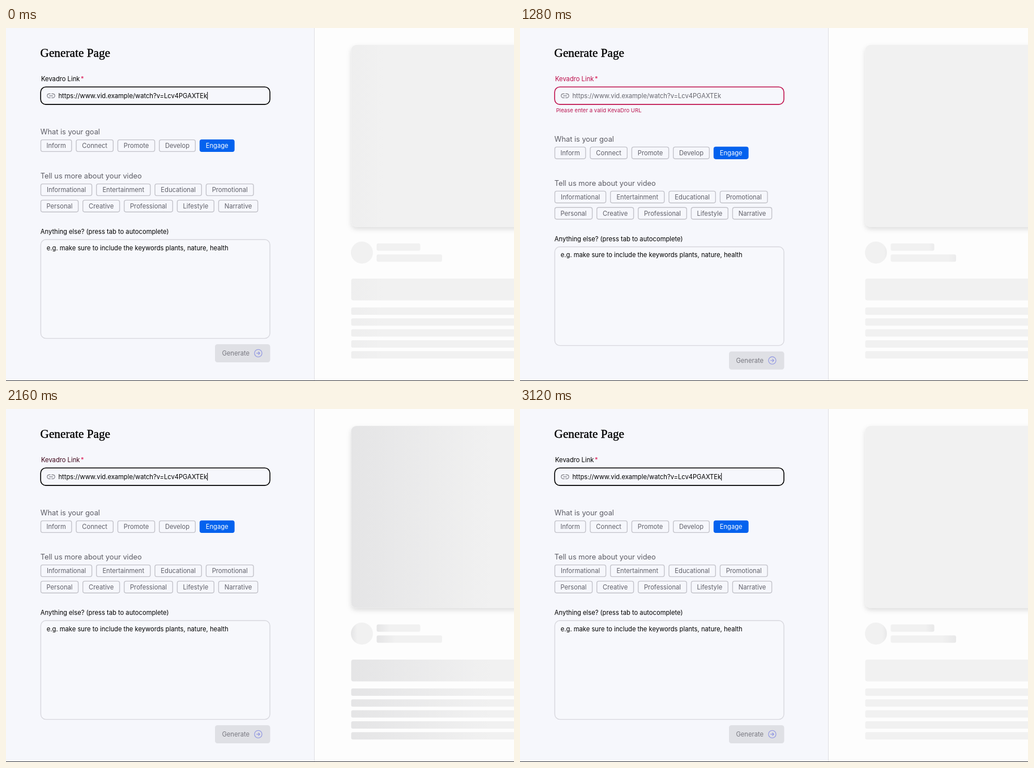
An HTML page that plays this animation: 897 px wide and 624 px high, repeating every 3200 ms.

```html
<!DOCTYPE html>
<html lang="en">
<head>
<meta charset="utf-8">
<title>Generate Page</title>
<style>
  html, body { margin: 0; width: 100%; height: 100%; overflow: hidden; background: #fdfdfd; }
  svg { display: block; font-family: Inter, "Liberation Sans", sans-serif; font-size: 11.2px; }
  .heading { font: 21.3px "Liberation Serif", serif; stroke: #000; stroke-width: .4; }
  .section { font-size: 12.8px; fill: #5c5c64; }
  .error { font-size: 9.6px; fill: #bb1550; }
  .chip rect { fill: none; stroke: #c3c3ca; stroke-width: 1.4; }
  .chip text { fill: #5f5f68; text-anchor: middle; }
  .chip.on rect { fill: #0462ee; stroke: #0462ee; }
  .chip.on text { fill: #fff; }
</style>
</head>
<body>
<svg width="897" height="624" viewBox="0 0 897 624">
  <defs>
    <linearGradient id="shimmer">
      <stop offset="0" stop-color="#f1f1f1"/>
      <stop offset=".5" stop-color="#dcdcde"/>
      <stop offset="1" stop-color="#f1f1f1"/>
    </linearGradient>
    <filter id="shadow" x="-5%" y="-5%" width="110%" height="115%">
      <feDropShadow dx="0" dy="4" stdDeviation="4" flood-opacity=".13"/>
    </filter>
  </defs>

  <rect width="544" height="624" fill="#f6f7fc"/>
  <rect x="544" width="1" height="624" fill="#dfdfe3"/>

  <text class="heading" x="60.5" y="51">Generate Page</text>
  <text x="62" y="94"><tspan id="label">Kevadro Link</tspan><tspan dx="1.5" fill="#dc1350">*</tspan></text>
  <rect id="field" x="61.2" y="104.3" width="404.8" height="30.8" rx="9" fill="none" stroke-width="1.6"/>
  <path d="M78.2 116.4h-1.9a3.5 3.5 0 0 0 0 7h1.9M80.8 116.4h1.9a3.5 3.5 0 0 1 0 7h-1.9M76.6 119.9h5.8"
        fill="none" stroke="#7b7b82" stroke-width="1.1" stroke-linecap="round"/>
  <text id="link" x="92.5" y="123.6">https://www.vid.example/watch?v=Lcv4PGAXTEk</text>
  <rect id="caret" y="113" width="1" height="13.5"/>
  <text id="error" class="error" x="63.7" y="149">Please enter a valid KevaDro URL</text>

  <g id="form">
    <text class="section" x="60.8" y="188.4">What is your goal</text>
    <text class="section" x="60.8" y="266.4">Tell us more about your video</text>
    <g id="chips"></g>
    <text x="60.8" y="364">Anything else? (press tab to autocomplete)</text>
    <rect x="61.4" y="374" width="404.6" height="174.6" rx="9" fill="#f7f8fc" stroke="#d8d8de" stroke-width="1.4"/>
    <text x="71.8" y="392.6">e.g. make sure to include the keywords plants, nature, health</text>
    <rect x="369" y="559" width="97.5" height="32" rx="4.5" fill="#dfe0e5"/>
    <text x="381.5" y="579" fill="#77777f">Generate</text>
    <g fill="none" stroke="#8e94e2" stroke-width="1.1" stroke-linecap="round" stroke-linejoin="round">
      <circle cx="445.4" cy="574.9" r="6.6"/>
      <path d="M442.6 574.9h5.6M445.8 572.5l2.4 2.4l-2.4 2.4"/>
    </g>
  </g>

  <g id="skeleton" fill="url(#shimmer)">
    <circle cx="628.5" cy="397" r="19.4"/>
  </g>
  <rect y="623" width="897" height="1" fill="#38383c"/>
</svg>

<script>
const LOOP = 3200, STEP = 80;
const SHIMMER_PERIOD = 2000, SHIMMER_LEAD = 100;
const LABEL_FADE = 200, ERROR_SHIFT = 12.8;
// Alternating moments at which the error appears and clears.
const TOGGLES = [400, 720, 1120, 1440, 1840, 2080, 2480, 2800];
const DANGER = [194, 14, 77];

const $ = id => document.getElementById(id);

function add(parent, tag, attrs, text = "") {
  const node = document.createElementNS("http://www.w3.org/2000/svg", tag);
  for (const key in attrs) node.setAttribute(key, attrs[key]);
  node.textContent = text;
  return parent.appendChild(node);
}

function addChips(y, chips) {
  for (const [name, left, right] of chips) {
    const chip = add($("chips"), "g", { class: name === "Engage" ? "chip on" : "chip" });
    add(chip, "rect", { x: left + .7, y: y - 10.4, width: right - left - 1.4, height: 20.8, rx: 3.4 });
    add(chip, "text", { x: (left + right) / 2, y: y + 4 }, name);
  }
}

addChips(208, [["Inform", 60.8, 116.5], ["Connect", 123.3, 190], ["Promote", 196.7, 263.3],
  ["Develop", 270, 335], ["Engage", 341.8, 403.6]]);
addChips(286, [["Informational", 60.8, 152.3], ["Entertainment", 159, 255.5],
  ["Educational", 262.3, 346], ["Promotional", 352.7, 437.7]]);
addChips(314.8, [["Personal", 60.8, 128.3], ["Creative", 135, 201.3], ["Professional", 208, 295],
  ["Lifestyle", 301.7, 368], ["Narrative", 374.7, 445.3]]);

const WIDE = 850;
const addBar = (x, y, width, height, rx, more) =>
  add($("skeleton"), "rect", { x, y, width, height, rx, ...more });
addBar(609.5, 30, WIDE, 321.5, 9, { filter: "url(#shadow)" });
addBar(654.5, 380.8, 77, 13, 3);
addBar(654.5, 400.2, 115.5, 13, 3);
addBar(609.5, 443, WIDE, 38.5, 4);
for (let i = 0; i < 5; i++) addBar(609.5, 494 + i * 19.3, WIDE, 13, 3);

// CSS "ease": cubic-bezier(.25, .1, .25, 1)
function ease(x) {
  const bezier = (a, b, s) => 3 * a * s * (1 - s) ** 2 + 3 * b * s * s * (1 - s) + s ** 3;
  let low = 0, high = 1;
  for (let i = 0; i < 24; i++) {
    const mid = (low + high) / 2;
    if (bezier(.25, .25, mid) < x) low = mid; else high = mid;
  }
  return bezier(.1, 1, low);
}

function drawForm(time) {
  const passed = TOGGLES.filter(moment => moment <= time);
  const invalid = passed.length % 2 === 1;
  const age = passed.length ? time - passed[passed.length - 1] : Infinity;
  const fade = age < LABEL_FADE ? ease(age / LABEL_FADE) : 1;
  const redness = invalid ? fade : 1 - fade;

  $("label").setAttribute("fill", `rgb(${DANGER.map(c => Math.round(c * redness))})`);
  $("field").setAttribute("stroke", invalid ? "#c01450" : "#000");
  $("link").setAttribute("fill", invalid ? "#66666e" : "#000");
  $("error").setAttribute("visibility", invalid ? "visible" : "hidden");
  $("form").setAttribute("transform", `translate(0 ${invalid ? ERROR_SHIFT : 0})`);

  const caret = $("caret");
  caret.setAttribute("x", invalid ? 92.5 : 92.5 + $("link").getComputedTextLength());
  caret.setAttribute("fill", invalid ? "#c01450" : "#000");
  caret.setAttribute("visibility", invalid && age >= STEP ? "hidden" : "visible");
}

function drawShimmer(time) {
  const front = 2 * ease((time + SHIMMER_LEAD) % SHIMMER_PERIOD / SHIMMER_PERIOD);
  $("shimmer").setAttribute("x1", front - 1);
  $("shimmer").setAttribute("x2", front);
}

function render() {
  const time = Math.floor(performance.now() % LOOP / STEP) * STEP;
  drawForm(time);
  drawShimmer(time);
  requestAnimationFrame(render);
}
render();
</script>
</body>
</html>
```
